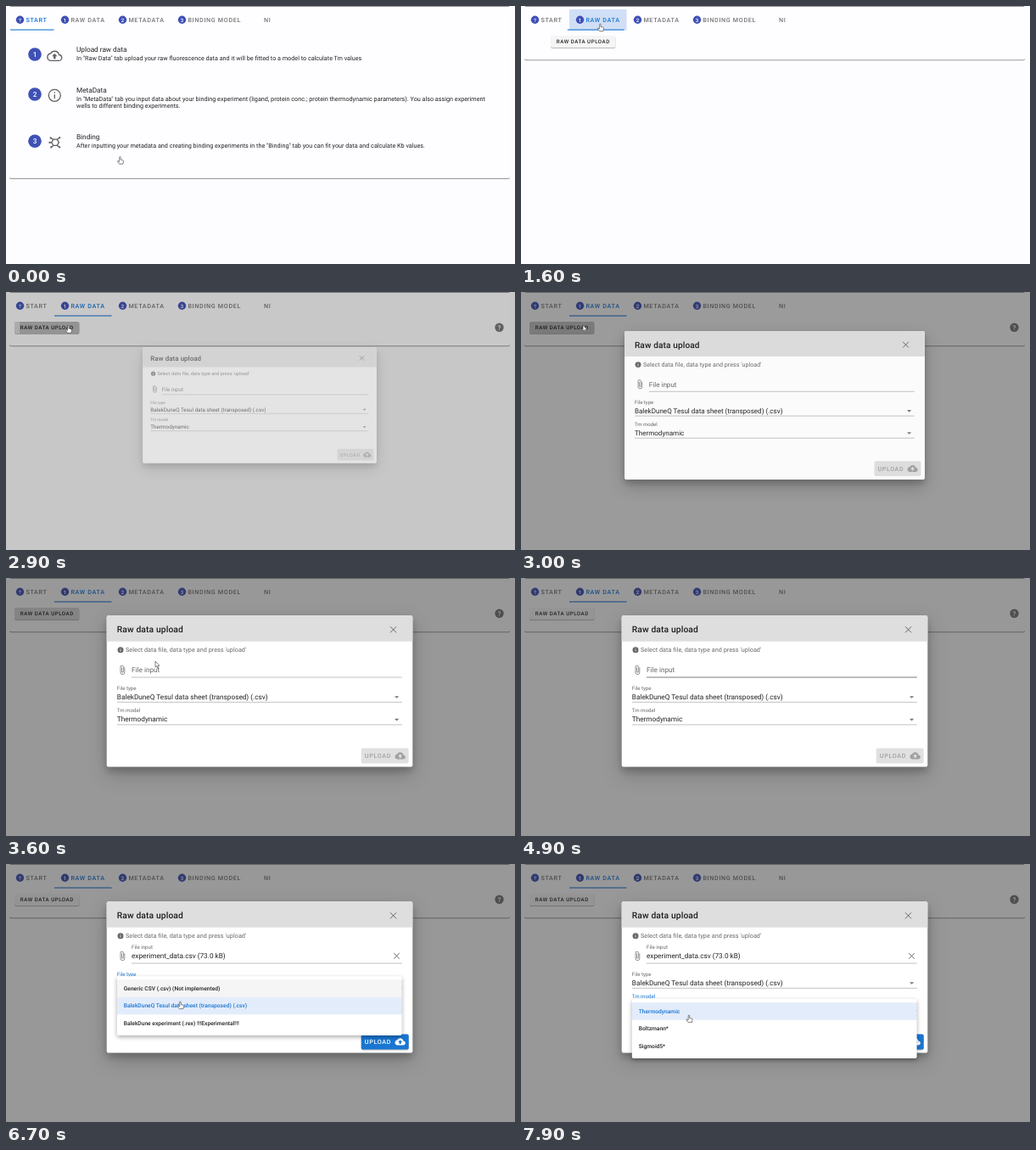
Write an HTML page that moves like this. It is 600 px wide and 304 px high and loops after 8 s.

```html
<!DOCTYPE html>
<html lang="en">
<head>
<meta charset="utf-8">
<title>Raw data upload</title>
<style>
  html, body { margin: 0; width: 100%; height: 100%; overflow: hidden; background: #fdfcfe; }
  svg { display: block; }
  text { font-family: Roboto, Arial, sans-serif; fill: #000000de; text-rendering: geometricPrecision; white-space: pre; }
  .t20 { font-size: 10.26px; font-weight: 500; letter-spacing: .0125em; }
  .t16 { font-size: 8.23px; }
  .t14 { font-size: 7.22px; }
  .t13 { font-size: 6.67px; font-weight: 500; }
  .t12 { font-size: 6.15px; }
  .caps { font-weight: 500; letter-spacing: .0893em; }
  .soft { fill: #0009; }
  .badge { fill: #3f51b5; }
  .num { fill: #fff; font-weight: 500; text-anchor: middle; }
  .icon { fill: #0000008a; }
  .line { fill: none; stroke: #5f5f5f; stroke-width: 1.3; }
  .cross { stroke-width: .95; }
  .tab text.caps { fill: #0000008a; }
  .tab.on text.caps { fill: #1976d2; }
  .card { fill: #fefdff; filter: drop-shadow(0 1px .5px #0006); }
  .raised { filter: drop-shadow(0 1px .6px #0004); }
  .float { fill: #fff; filter: drop-shadow(0 2px 2.5px #0005); }
  .modal { fill: #fff; filter: drop-shadow(0 5px 4px #0003) drop-shadow(0 8px 11px #0003); }
  .field line { stroke: #0000006b; stroke-width: .6; }
  .field.hover line { stroke: #000000de; }
  .field.on line { stroke: #1976d2; stroke-width: 1; }
  .field.on .label { fill: #1976d2; }
  .upload rect { fill: #0000001f; }
  .upload text, .upload path { fill: #00000048; }
  .upload.on rect { fill: #1976d2; filter: drop-shadow(0 1px .6px #0004); }
  .upload.on text, .upload.on path { fill: #fff; }
  .cursor { fill: #fff; stroke: #4a4a4a; stroke-width: .8; stroke-linejoin: round; }
</style>
</head>
<body>
<svg width="600" height="304" viewBox="0 0 600 304">
  <defs>
    <clipPath id="window"><rect id="clip" x="4" y="29" width="590" height="174"/></clipPath>
    <clipPath id="press"><rect x="10" y="35" width="76.5" height="14" rx="2"/></clipPath>
  </defs>
  <rect class="card" id="card" x="4" y="3" width="590" height="200" rx="2"/>
  <rect class="card" x="4" y="-6" width="590" height="6" rx="2"/>
  <rect id="tabHover" x="57" y="4" width="67.5" height="24.4" fill="#1967d2"/>
  <g id="tabs"></g>
  <text class="t14 caps icon" x="304" y="18.7">NI</text>
  <rect id="slider" y="27.5" height="1.1" fill="#1976d2"/>

  <g clip-path="url(#window)">
    <g id="startPage">
      <g id="steps"></g>
      <g class="line">
        <path stroke-width="2" transform="translate(57.3 58.8) scale(.7) translate(-12 -12)" d="M19.35 10.04C18.67 6.59 15.64 4 12 4 9.11 4 6.6 5.64 5.35 8.04 2.34 8.36 0 10.91 0 14c0 3.31 2.69 6 6 6h13c2.76 0 5-2.24 5-5 0-2.64-2.05-4.78-4.65-4.96z"/>
        <circle cx="57.3" cy="105.3" r="7"/>
        <path d="M57.3 104.3v4.8M57.3 101.2v1.5"/>
        <path d="M55.8 157.2h4.4l2.2 3.6-2.2 3.6h-4.4l-2.2-3.6zM55.8 157.2l-3-1.6M60.2 157.2l2.8-1.8M55.8 164.4l-2.4 1.8M60.2 164.4l2.8 1.8M53.6 160.8h-2.4"/>
      </g>
      <path fill="#5f5f5f" d="M57.3 56l3.2 3.2h-2V62.3h-2.4V59.2h-2z"/>
      <g id="nodes" fill="#5f5f5f"></g>
    </g>
    <g id="rawPage">
      <rect class="raised" x="10" y="35" width="76.5" height="14" rx="2" fill="#f5f5f5"/>
      <g clip-path="url(#press)">
        <rect id="shade" x="10" y="35" width="76.5" height="14"/>
        <circle id="ripple" cx="74" cy="42"/>
      </g>
      <text class="t12 caps" x="16.8" y="44.2">RAW DATA UPLOAD</text>
      <circle class="icon" cx="581.5" cy="41.7" r="5.2"/>
      <text class="num" font-size="8" x="581.5" y="44.6">?</text>
    </g>
  </g>

  <rect id="scrim" width="600" height="304" fill="#212121"/>

  <g id="dialog">
    <rect class="modal" x="118.7" y="44.3" width="360.6" height="178.3" rx="2"/>
    <path fill="#dedede" d="M118.7 74.8V46.3a2 2 0 0 1 2-2H477.3a2 2 0 0 1 2 2V74.8z"/>
    <text class="t20" x="130.8" y="64.4">Raw data upload</text>
    <path class="line cross" d="M453 57.3l7 7M460 57.3l-7 7"/>
    <circle class="soft" cx="135" cy="84.7" r="3.5"/>
    <path stroke="#fff" stroke-width=".8" d="M135 84.2v2.4M135 82.6v.8"/>
    <text class="t14 soft" letter-spacing=".05" x="141" y="87.2">Select data file, data type and press 'upload'</text>

    <g class="field" id="file">
      <path class="icon" transform="translate(131 102.2) scale(.513)" d="M16.5 6v11.5c0 2.21-1.79 4-4 4s-4-1.79-4-4V5a2.5 2.5 0 0 1 5 0v10.5c0 .55-.45 1-1 1s-1-.45-1-1V6H10v9.5a2.5 2.5 0 0 0 5 0V5c0-2.21-1.79-4-4-4S7 2.79 7 5v12.5c0 3.04 2.46 5.5 5.5 5.5s5.5-2.46 5.5-5.5V6h-1.5z"/>
      <text class="label soft" id="fileLabel" x="148">File input</text>
      <g id="fileValue">
        <text class="t16" x="148" y="111.3">experiment_data.csv (73.0 kB)</text>
        <path class="line cross" d="M457.2 105l6.6 6.6M463.8 105l-6.6 6.6"/>
      </g>
      <line x1="148" x2="466.8" y1="117" y2="117"/>
    </g>
    <g class="field" id="type">
      <text class="t12 label soft" x="130.8" y="131.7">File type</text>
      <text class="t16" x="130.8" y="142.8">BalekDuneQ Tesul data sheet (transposed) (.csv)</text>
      <path class="icon" d="M458 139.2h5.2l-2.6 2.6z"/>
      <line x1="130.8" x2="466.8" y1="146.3" y2="146.3"/>
    </g>
    <g class="field" id="model">
      <text class="t12 label soft" x="130.8" y="158.2">Tm model</text>
      <text class="t16" x="130.8" y="169.4">Thermodynamic</text>
      <path class="icon" d="M458 165.8h5.2l-2.6 2.6z"/>
      <line x1="130.8" x2="466.8" y1="172.9" y2="172.9"/>
    </g>
    <g class="upload" id="upload">
      <rect x="418.7" y="200.5" width="56" height="18" rx="2"/>
      <text class="t14 caps" x="422.8" y="212.1">UPLOAD</text>
      <path transform="translate(458.5 203.3) scale(.513)" d="M19.35 10.04C18.67 6.59 15.64 4 12 4 9.11 4 6.6 5.64 5.35 8.04 2.34 8.36 0 10.91 0 14c0 3.31 2.69 6 6 6h13c2.76 0 5-2.24 5-5 0-2.64-2.05-4.78-4.65-4.96zM14 13v4h-4v-4H7l5-5 5 5h-3z"/>
    </g>
  </g>

  <g id="typeMenu"></g>
  <g id="modelMenu"></g>

  <g class="cursor" id="cursor">
    <path id="hand" d="M-.4 1.6a.9.9 0 0 1 1.8 0V4.8l3 .7q1 .3.9 1.3l-.7 4H-.5L-3.1 7.4q-.2-1 1-.8l1.7 1z"/>
    <path id="arrow" d="M0 0V8.5l1.9-1.7 1.4 3 1.3-.6-1.4-2.9H5.8z"/>
  </g>
</svg>
<script>
const $ = id => document.getElementById(id);
const set = (id, attrs) => { for (const k in attrs) $(id).setAttribute(k, attrs[k]); };
const show = (id, on) => { $(id).style.display = on ? '' : 'none'; };
const flag = (id, name, on) => $(id).classList.toggle(name, on);

// Static parts built from short lists
$('tabs').innerHTML = [['?', 'START', 16.5], [1, 'RAW DATA', 69.5], [2, 'METADATA', 137.5], [3, 'BINDING MODEL', 207.5]]
  .map(([mark, name, x], i) => `<g class="tab" id="tab${i}">
    <circle class="badge" cx="${x}" cy="16.3" r="4.7"/>
    <text class="num" font-size="6" x="${x}" y="18.5">${mark}</text>
    <text class="t14 caps" x="${x + 6.9}" y="18.7">${name}</text></g>`).join('');

$('steps').innerHTML = [
  [57, 54.3, 'Upload raw data', 'In "Raw Data" tab upload your raw fluorescence data and it will be fitted to a model to calculate Tm values'],
  [104, 101.8, 'MetaData', 'In "MetaData" tab you input data about your binding experiment (ligand, protein conc.; protein thermodynamic parameters). You also assign experiment', 'wells to different binding experiments.'],
  [159.3, 157.1, 'Binding', 'After inputting your metadata and creating binding experiments in the "Binding" tab you can fit your data and calculate Kb values.']
].map(([cy, y, title, ...lines], i) => `<circle class="badge" cx="34" cy="${cy}" r="7.8"/>
  <text class="num t16" x="34" y="${cy + 2.9}">${i + 1}</text>
  <text class="t16" x="83" y="${y}">${title}</text>` +
  lines.map((s, k) => `<text class="t14" x="83" y="${y + 9.8 + k * 7.9}">${s}</text>`).join('')).join('');

$('nodes').innerHTML = [[52.6, 155.4], [63.2, 155.2], [53.2, 166.4], [63.2, 166.4], [51.4, 160.8]]
  .map(([x, y]) => `<circle cx="${x}" cy="${y}" r="1.1"/>`).join('');

const ROW = 20.53;
function buildMenu(id, top, items, selected) {
  const rowY = i => top + 4.1 + i * ROW;
  $(id).innerHTML = `<rect class="float" x="130.8" y="${top}" width="335.8" height="${8.2 + ROW * items.length}" rx="2"/>
    <rect id="${id}Hover" x="130.8" y="${rowY(0)}" width="335.8" height="${ROW}" opacity=".04"/>
    <rect x="130.8" y="${rowY(selected)}" width="335.8" height="${ROW}" fill="#1967d2" opacity=".12"/>` +
    items.map((s, i) => `<text class="t13" x="138.8" y="${rowY(i) + 12.65}"${i === selected ? ' style="fill:#1976d2"' : ''}>${s}</text>`).join('');
}
buildMenu('typeMenu', 132.2, ['Generic CSV (.csv) (Not implemented)', 'BalekDuneQ Tesul data sheet (transposed) (.csv)', 'BalekDune experiment (.rex) !!!Experimental!!!'], 1);
buildMenu('modelMenu', 159.1, ['Thermodynamic', 'Boltzmann*', 'Sigmoid5*'], 0);
show('modelMenuHover', false);

// Motion
const LOOP = 8000, STEP = 100;
const ramp = (t, from, length) => Math.min(1, Math.max(0, (t - from) / length));
const easeOut = p => 1 - (1 - p) ** 3;
const smooth = p => p * p * (3 - 2 * p);
const mix = (a, b, p) => a + (b - a) * p;
const within = (t, a, b) => t >= a && t < b;

// Pointer stops: time, x, y
const stops = [[100, 134, 177], [900, 92, 30], [1000, 93, 20.5], [1900, 93, 20.5], [2600, 73, 39], [3000, 73, 39],
  [3600, 176, 98], [3700, 180, 104], [5700, 262, 165], [6300, 205, 138], [6500, 205, 138], [6700, 205, 161.5],
  [6900, 205, 162], [7300, 197.5, 164], [7600, 197.5, 164], [7800, 197.5, 177.5]];

function pointer(t) {
  const i = stops.findIndex(s => s[0] > t);
  if (i === 0) return stops[0].slice(1);
  if (i < 0) return stops[stops.length - 1].slice(1);
  const [a, b] = [stops[i - 1], stops[i]], p = smooth(ramp(t, a[0], b[0] - a[0]));
  return [mix(a[1], b[1], p), mix(a[2], b[2], p)];
}

function draw(t) {
  // Tab switch
  const slide = easeOut(ramp(t, 1400, 307)), fold = easeOut(ramp(t, 1400, 200));
  const bottom = mix(203, 63.3, fold);
  set('card', { height: bottom - 3 });
  set('clip', { height: bottom - 29 });
  set('slider', { x: mix(5, 57, slide), width: mix(51.5, 67.5, slide) });
  set('startPage', { transform: `translate(${-590 * slide})` });
  set('rawPage', { transform: `translate(${590 * (1 - slide)})` });
  show('startPage', slide < 1);
  show('rawPage', slide > 0);
  flag('tab0', 'on', t < 1400);
  flag('tab1', 'on', t >= 1400);
  set('tabHover', { opacity: t < 1000 ? 0 : t < 1400 ? .08 : .2 * (1 - ramp(t, 2000, 300)) });

  // Button press
  set('shade', { opacity: within(t, 2500, 2800) ? .05 : within(t, 2800, 3900) ? .12 : 0 });
  set('ripple', { r: 90 * ramp(t, 2745, 240), opacity: .15 * (1 - ramp(t, 2900, 300)) });

  // Dialog
  const open = easeOut(ramp(t, 2850, 225));
  set('scrim', { opacity: .46 * open });
  set('dialog', { opacity: open, transform: `translate(299 133.5) scale(${.5 + .5 * open}) translate(-299 -133.5)` });
  const loaded = t >= 5400;
  flag('file', 'hover', within(t, 3700, 5400));
  flag('file', 'on', within(t, 5400, 6400));
  flag('type', 'on', within(t, 6400, 7600));
  flag('model', 'on', t >= 7600);
  flag('upload', 'on', loaded);
  show('fileValue', loaded);
  set('fileLabel', { class: 'label soft ' + (loaded ? 't12' : 't16'), y: loaded ? 99.9 : 111.3 });

  // Menus
  set('typeMenu', { opacity: ramp(t, 6400, 200) * (1 - ramp(t, 6900, 200)) });
  set('modelMenu', { opacity: ramp(t, 7600, 200) });
  show('typeMenuHover', t <= 6700);

  // Pointer
  set('cursor', { transform: `translate(${pointer(t)}) scale(.85)` });
  show('cursor', !within(t, 4200, 5700));
  const plain = within(t, 3000, 3700) || within(t, 5700, 6100);
  show('arrow', plain);
  show('hand', !plain);
}

function tick() {
  const t = (performance.now() + 10) % LOOP;
  draw(Math.floor(t / STEP) * STEP);
  requestAnimationFrame(tick);
}
tick();
</script>
</body>
</html>
```
